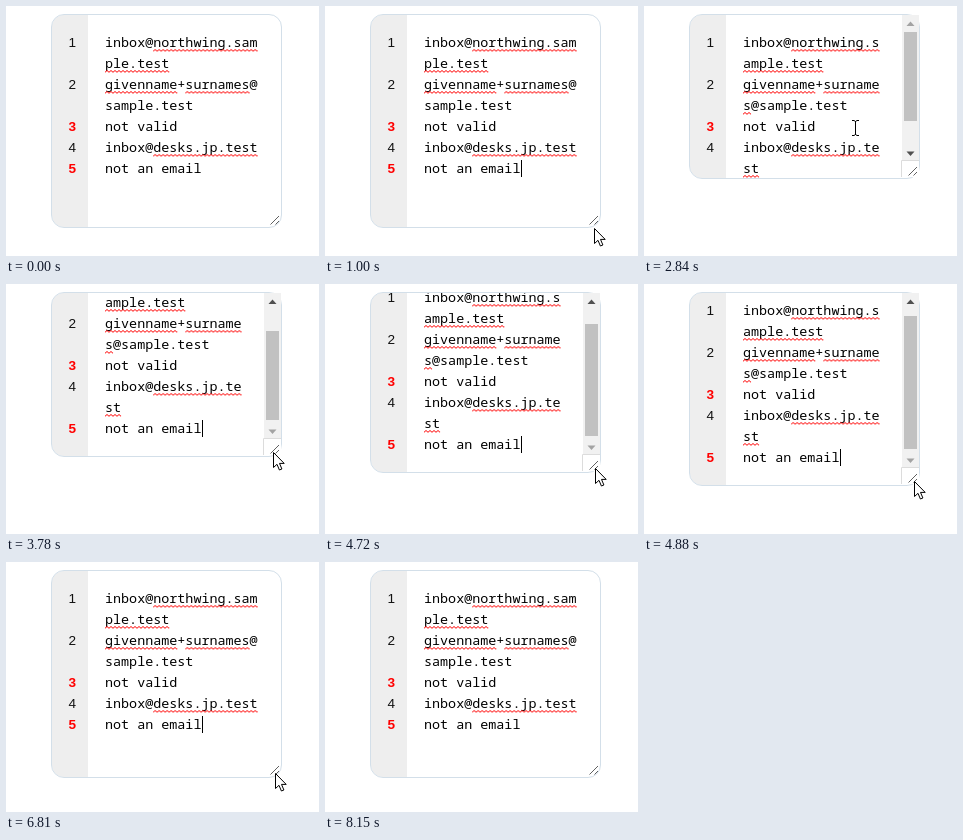
An HTML page that plays this animation: 313 px wide and 250 px high, repeating every 8240 ms.

```html
<!DOCTYPE html>
<html lang="en">
<head>
<meta charset="utf-8">
<title>Email list field</title>
<style>
  html, body { margin: 0; width: 100%; height: 100%; overflow: hidden; background: #fff; }
  svg { display: block; width: 313px; height: 250px; }
  .row { font: 13.4px "Noto Sans Mono", monospace; white-space: pre; }
  .num { font: 13.6px "Liberation Sans", Arial, sans-serif; fill: #111; }
  .bad { font-weight: bold; fill: #f00; }
</style>
</head>
<body>
<svg id="stage" viewBox="0 0 313 250">
  <defs>
    <pattern id="wave" width="4" height="3" patternUnits="userSpaceOnUse">
      <path d="M-1 3.2L2 .5L5 3.2" fill="none" stroke="#f00"/>
    </pattern>
    <clipPath id="inner"><rect id="clipBox" x="46" y="9" width="229" rx="12"/></clipPath>
  </defs>
  <g clip-path="url(#inner)">
    <rect x="46" y="9" width="36" height="241" fill="#eee"/>
    <g id="content"></g>
  </g>
  <rect id="frame" x="45.5" y="8.5" width="230" rx="12.5" fill="none" stroke="#d3dfe9"/>
  <g id="bar">
    <rect id="track" x="258" y="9" width="17" fill="#f1f1f1"/>
    <rect id="thumb" x="260" width="13" fill="#c1c1c1"/>
    <path id="up" d="M262.5 20L266.5 15.5L270.5 20Z"/>
    <path id="down" d="M262.5 -27.5L266.5 -23L270.5 -27.5Z"/>
    <g id="corner">
      <rect x="258" y="-19" width="17" height="17" fill="#fff"/>
      <path d="M257.5 -2V-18.5H275" fill="none" stroke="#dcdcdc"/>
    </g>
  </g>
  <path id="grip" d="M264.5 -3.5L273 -12M269.5 -3.5L273 -7" fill="none" stroke="#606060"/>
  <path id="arrow" d="M.5 .5V15.5L4 12.3L6.4 18L8.9 17L6.5 11.4H11.2Z" fill="#fff" stroke="#000"/>
  <path id="beam" d="M-3 -7.5H-1L.5 -6.5L2 -7.5H4M-3 7.5H-1L.5 6.5L2 7.5H4M.5 -7V7" fill="none" stroke="#000"/>
</svg>
<script>
const LOOP = 8240, TICK = 78, BLINK = 495;
const LINE = 21, BASE = 41, LEFT = 99;
const FULL = 212;   // bottom edge at which the narrow text fits
const GRAB = 5;     // pointer tip above the bottom edge while resizing
const $ = id => document.getElementById(id);

const entries = [
  'inbox@northwing.sample.test', 'givenname+surnames@sample.test',
  'not valid', 'inbox@desks.jp.test', 'not an email'
];
const misspelt = /northwing.+|givenname|surnames|desks.+/g;

// pointer moves: start, end, x, y, whether the field is resized
const start = { x: 281, y: 256, bottom: 222 };
const moves = [
  [430, 1280, 267, 217],
  [1283, 1820, 264, 168, true],
  [2382, 2847, 211, 122],
  [3540, 3780, 267, 168],
  [3780, 3940, 274, 169],
  [4100, 4260, 271, 168],
  [4640, 4870, 270, 197, true],
  [5100, 5340, 269, 203, true],
  [5420, 5740, 269, 211, true],
  [7450, 7670, 267, 256]
];

// eased progress that advances once per screen tick
function progress(t, from, to) {
  const n = Math.round((to - from) / TICK);
  const p = Math.min(1, Math.max(0, Math.floor((t - from) / (to - from) * n + .15) / n));
  return 1 - (1 - p) ** 2;
}

function pose(t) {
  let { x, y, bottom } = start;
  for (const [from, to, toX, toY, resize] of moves) {
    const p = progress(t, from, to);
    x += (toX - x) * p;
    y += (toY - y) * p;
    if (resize) bottom += (toY + GRAB - bottom) * p;
  }
  return [x, y, bottom].map(Math.round);
}

function caretOn(t) {
  const since = t < 4500 ? t - 510 : Math.max(0, t - 6640);
  return since >= 0 && Math.floor(since / BLINK) % 2 === 0;
}

function set(el, attrs) {
  for (const k in attrs) el.setAttribute(k, attrs[k]);
}
function add(parent, tag, attrs, text = '') {
  const el = document.createElementNS('http://www.w3.org/2000/svg', tag);
  set(el, attrs);
  el.textContent = text;
  return parent.appendChild(el);
}
const show = (el, on) => set(el, { visibility: on ? 'inherit' : 'hidden' });
const move = (el, x, y) => set(el, { transform: `translate(${x} ${y})` });

const probe = add($('content'), 'text', { class: 'row' }, entries[3]);
const charW = probe.getComputedTextLength() / entries[3].length;
probe.remove();

// lay out the text and its line numbers for a given column count
function layout(cols) {
  const rows = add($('content'), 'g', {}), nums = add($('content'), 'g', {});
  let y = BASE;
  entries.forEach((text, i) => {
    const cls = text.includes('@') ? 'num' : 'num bad';
    add(nums, 'text', { class: cls, x: 62.6, y }, i + 1);
    for (let c = 0; c < text.length; c += cols, y += LINE) {
      add(rows, 'text', { class: 'row', x: LEFT, y }, text.slice(c, c + cols));
      for (const m of text.matchAll(misspelt)) {
        const a = Math.max(m.index, c), b = Math.min(m.index + m[0].length, c + cols);
        if (a < b) move(add(rows, 'rect', {
          width: (b - a) * charW, height: 3, fill: 'url(#wave)'
        }), LEFT + (a - c) * charW, y + 2);
      }
    }
  });
  return { rows, nums, lastY: y - LINE };
}
const wide = layout(19), slim = layout(17);
const caret = add($('content'), 'rect', { x: 196, width: 1, height: 17 });

function draw(t) {
  const [x, y, bottom] = pose(t);
  const narrow = bottom < (t < 3000 ? 190 : FULL);
  const scroll = narrow ? Math.round((FULL - bottom) * progress(t, 2847, 3080)) : 0;
  const slimNums = t > 1580 && t < 6810;   // numbers lag behind the wrapping

  set($('clipBox'), { height: bottom - 10 });
  set($('frame'), { height: bottom - 9 });
  move($('content'), 0, -scroll);
  show(wide.rows, !narrow);
  show(slim.rows, narrow);
  show(wide.nums, !slimNums);
  show(slim.nums, slimNums);
  set(caret, { y: (narrow ? slim : wide).lastY - 13 });
  show(caret, caretOn(t));

  show($('bar'), narrow);
  const view = bottom - 11, total = FULL - 11, room = view - 51;
  set($('track'), { height: view - 17 });
  set($('thumb'), {
    y: 26 + Math.floor(room * scroll / total),
    height: Math.round(room * Math.min(1, view / total))
  });
  set($('up'), { fill: scroll ? '#505050' : '#a3a3a3' });
  set($('down'), { fill: scroll < FULL - bottom ? '#505050' : '#a3a3a3' });
  for (const id of ['down', 'corner', 'grip']) move($(id), 0, bottom);

  const overText = x < 258 && y < bottom;
  show($('arrow'), !overText);
  show($('beam'), overText);
  move($('arrow'), x, y);
  move($('beam'), x, y);
}

const began = performance.now();
function tick() {
  draw((performance.now() - began) % LOOP);
  requestAnimationFrame(tick);
}
tick();
</script>
</body>
</html>
```
